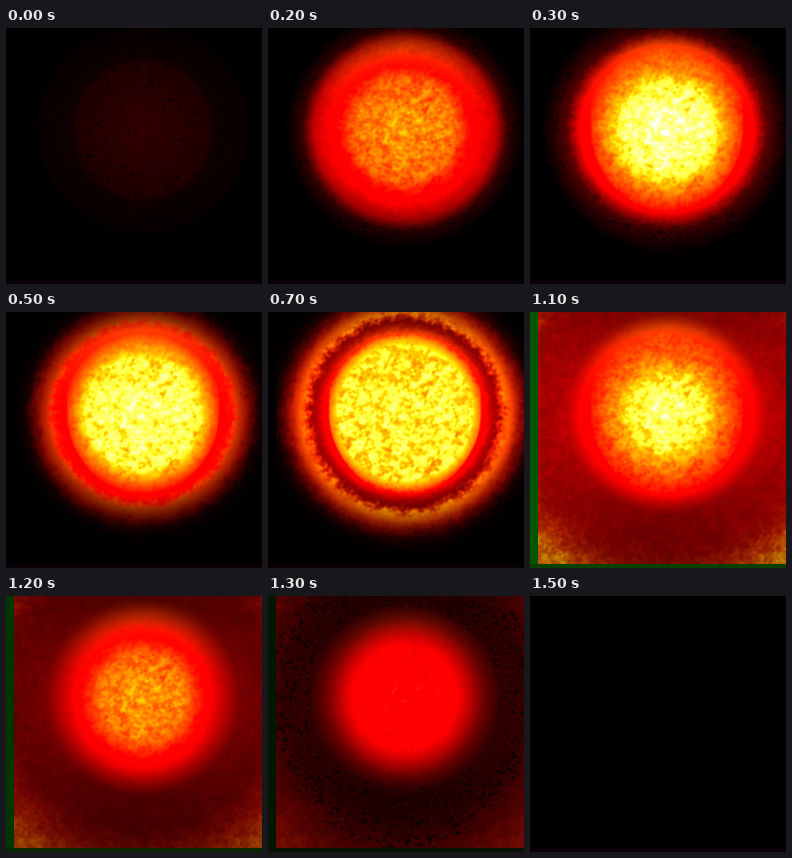
Write an HTML page with a canvas that moves like this. It is 256 px wide and 256 px high and loops after 1600 ms.

```html
<!DOCTYPE html>
<html lang="en">
<head>
<meta charset="utf-8">
<title>Fireball</title>
<style>
html, body { margin: 0; width: 100%; height: 100%; overflow: hidden; background: #000; }
canvas { display: block; width: 256px; height: 256px; }
</style>
</head>
<body>
<canvas id="stage" width="256" height="256"></canvas>
<script>
const SIZE = 256, STEP_MS = 100, STEPS = 16;
const CX = 136.5, CY = 101;
const ctx = document.getElementById('stage').getContext('2d');

// radii/heat: fireball profile; ring: radius, inner and outer softness, red, green; rim: border green
const poses = [
  { at: 0, radii: [0, 66, 74, 104, 106, 107], heat: [.19, .12, .05, .04, 0, 0], ring: [80, 8, 12, 0, 0], rim: 0 },
  { at: 3, radii: [0, 44, 58, 84, 100, 125], heat: [2.5, 2.2, 1.75, 1.1, .32, 0], ring: [86, 8, 12, .05, 0], rim: 0 },
  { at: 7, radii: [0, 68, 75, 82, 92, 110], heat: [2.08, 2, 1.6, 1, .2, 0], ring: [102, 8, 13, 1, .34], rim: 0 },
  { at: 9, radii: [0, 66, 73, 80, 102, 125], heat: [2.08, 2, 1.65, 1.2, .15, 0], ring: [120, 8, 25, .95, .36], rim: 45 },
  { at: 11, radii: [0, 36, 50, 82, 100, 150], heat: [2.35, 2.05, 1.7, 1.12, .72, .42], ring: [190, 36, 60, .45, .36], rim: 85 },
  { at: 13, radii: [0, 50, 60, 78, 95, 120], heat: [1.1, 1.05, .85, .42, .17, .1], ring: [200, 45, 60, .42, .04], rim: 22 },
  { at: 15, radii: [0, 50, 60, 78, 95, 120], heat: [0, 0, 0, 0, 0, 0], ring: [205, 45, 60, 0, 0], rim: 0 }
];

const mix = (a, b, k) => a + (b - a) * k;
const clamp = v => Math.min(1, Math.max(0, v));
const mixList = (a, b, k) => a.map((v, i) => mix(v, b[i], k));
const bell = v => Math.exp(-v * v / 2);

function hash(x, y) {
  let h = Math.imul(x, 374761393) + Math.imul(y, 668265263);
  h = Math.imul(h ^ (h >>> 13), 1274126177);
  return ((h ^ (h >>> 16)) >>> 0) / 4294967296;
}

function noise(x, y) {
  const ix = Math.floor(x), iy = Math.floor(y);
  const ease = v => v * v * (3 - 2 * v);
  const u = ease(x - ix), v = ease(y - iy);
  return mix(mix(hash(ix, iy), hash(ix + 1, iy), u),
             mix(hash(ix, iy + 1), hash(ix + 1, iy + 1), u), v);
}

const pixels = [];
for (let y = 0; y < SIZE; y++) {
  for (let x = 0; x < SIZE; x++) {
    const dx = x - CX, dy = y - CY, r = Math.hypot(dx, dy);
    const upright = (dy / (r || 1)) ** 2;
    const fine = noise((x + y * .5) / 3.2 + 40, (y - x * .4) / 3.2 + 90);
    const coarse = noise((x + y * .4) / 7, (y - x * .25) / 6);
    // Orange light is cut off at the sides and tapers below
    const edge = dy < 0 ? 77 - Math.abs(dx) : 77 + 6 * upright ** 2 - r;
    pixels.push({
      x, y, r, fine, upright,
      grain: .5 * (coarse + fine) - .5,
      lit: clamp(edge / 2),
      haze: dy < 0 ? upright * bell((r - 84) / 10) : 0,
      shade: 1 - .35 * upright * clamp((r - 74) / 26)
    });
  }
}

function poseAt(step) {
  const i = Math.max(1, poses.findIndex(p => p.at >= step));
  const a = poses[i - 1], b = poses[i], k = (step - a.at) / (b.at - a.at);
  return {
    radii: mixList(a.radii, b.radii, k),
    heat: mixList(a.heat, b.heat, k),
    ring: mixList(a.ring, b.ring, k),
    rim: mix(a.rim, b.rim, k)
  };
}

function profile(radii, heat, r) {
  const i = radii.findIndex(v => v > r);
  if (i < 0) return heat[heat.length - 1];
  return mix(heat[i - 1], heat[i], (r - radii[i - 1]) / (radii[i] - radii[i - 1]));
}

function render(step) {
  const image = ctx.createImageData(SIZE, SIZE);
  const { radii, heat, ring, rim } = poseAt(step);
  const [ringR, inner, outer, ringRed, ringGreen] = ring;
  const jitter = 9 * Math.min(1, step / 3);
  pixels.forEach((p, i) => {
    let red, green, blue;
    if (p.x < 8 || p.y >= 252) {
      red = p.y >= 252 ? 8 : 0;
      green = rim * (p.y >= 252 ? .75 : 1);
      blue = red / 2;
    } else {
      const r = Math.max(0, p.r + p.grain * jitter);
      const base = profile(radii, heat, r);
      const h = base * (1 + p.grain * (.3 + .15 * clamp(base - 1)));
      const glow = bell((r - ringR) / (r < ringR ? inner : outer)) * (1 + p.grain * .3);
      const level = h * p.shade + ringRed * glow * (1 - .3 * p.upright);
      const speckled = level < .22 && p.fine < .08 + p.r / 700;
      red = 255 * level * (speckled ? .5 : 1);
      green = p.lit * Math.max(0, h - 1.15) * 275
        + 60 * p.haze * clamp(h) ** 2
        + 255 * ringGreen * glow ** 4;
      blue = (h - 1.92) * 320;
    }
    image.data.set([red, green, blue, 255], i * 4);
  });
  return image;
}

const frames = Array.from({ length: STEPS }, (_, step) => render(step));
const start = performance.now();
let shown = -1;

function draw() {
  const step = Math.floor((performance.now() - start) / STEP_MS) % STEPS;
  if (step !== shown) {
    ctx.putImageData(frames[step], 0, 0);
    shown = step;
  }
  requestAnimationFrame(draw);
}
draw();
</script>
</body>
</html>
```
